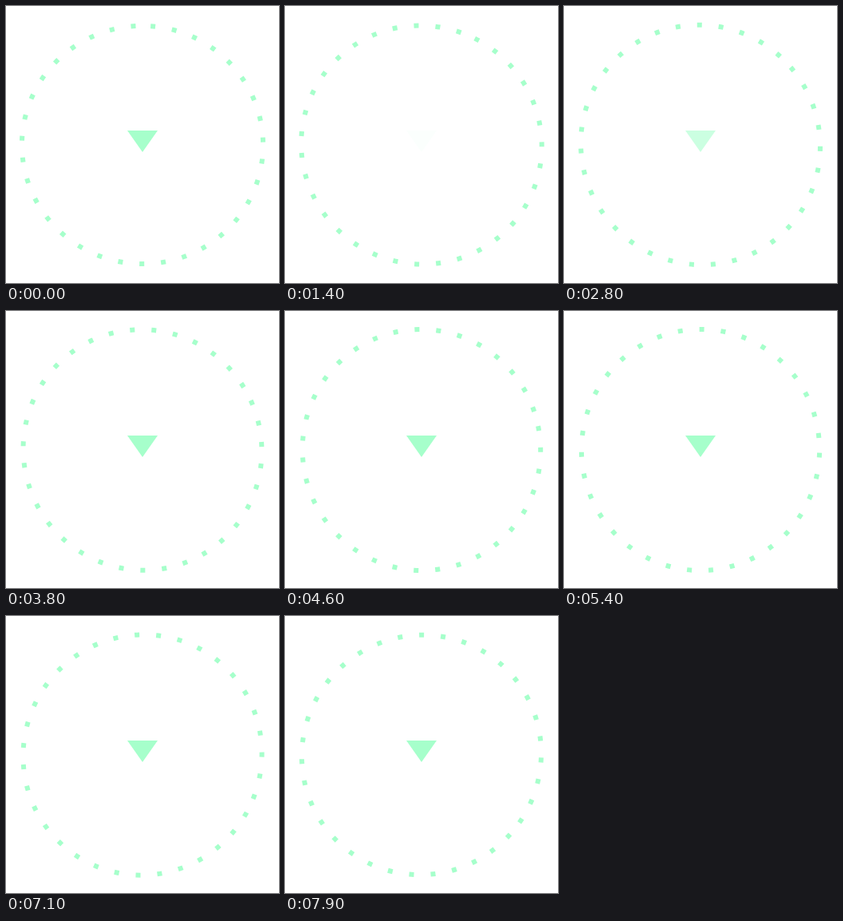
An HTML page that plays this animation: 342x347 px, repeating every 8000 ms.

```html
<!DOCTYPE html>
<html lang="en">
<head>
<meta charset="utf-8">
<title>Dashed ring</title>
<style>
  html, body { margin: 0; width: 100%; height: 100%; overflow: hidden; background: #fff; }
  svg { display: block; width: 342px; height: 347px; }
  #ring { fill: none; stroke: #a6ffcb; stroke-width: 6; stroke-dasharray: 6 21; }
  #arrow { fill: #a6ffcb; }
</style>
</head>
<body>
<svg viewBox="0 0 342 347">
  <g transform="translate(171 174)">
    <ellipse id="ring" rx="149.1" ry="151.1" transform="rotate(-86.1)"/>
  </g>
  <path id="arrow" d="M152 156H190L171 183Z"/>
</svg>
<script>
  const LOOP = 8000, STEP = 100;
  const BLINK = 1500, FADE_START = 1220, FADE = 190;
  const START_ANGLE = -86.1, DEG_PER_MS = 0.0162;
  const ring = document.getElementById('ring');
  const arrow = document.getElementById('arrow');
  const clamp = v => Math.min(1, Math.max(0, v));

  function draw(now) {
    // The motion advances ten times a second.
    const t = Math.floor((now % LOOP) / STEP) * STEP;
    ring.setAttribute('transform', `rotate(${START_ANGLE + t * DEG_PER_MS})`);
    arrow.style.opacity = 1 - clamp((t % BLINK - FADE_START) / FADE);
    requestAnimationFrame(draw);
  }
  draw(performance.now());
</script>
</body>
</html>
```
